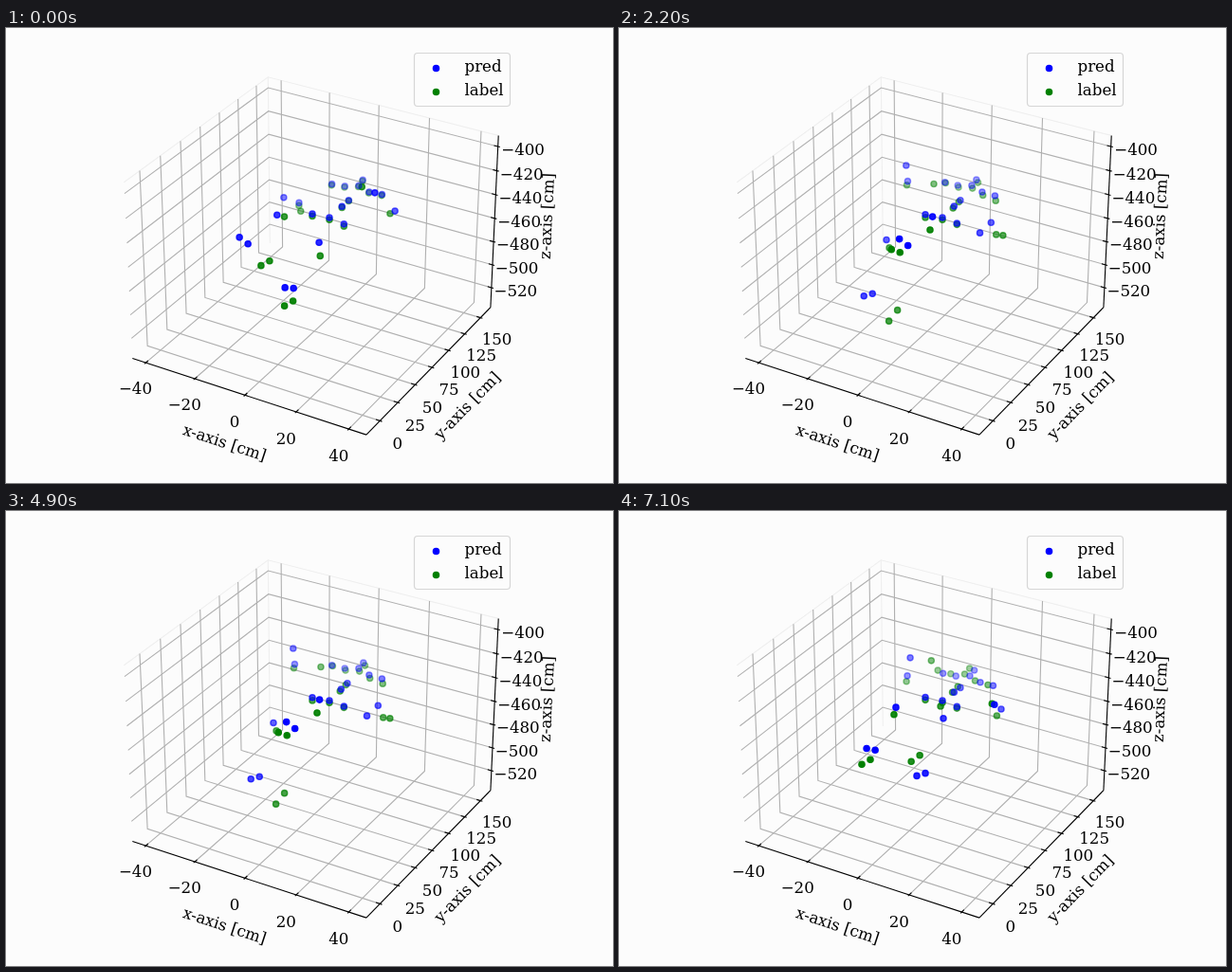
An HTML page that plays this animation: 640 px wide and 480 px high, repeating every 7200 ms.

```html
<!DOCTYPE html>
<html lang="en">
<head>
<meta charset="utf-8">
<title>Pose scatter</title>
<style>
  html, body { margin: 0; width: 100%; height: 100%; overflow: hidden; background: #fcfcfc; }
  svg { display: block; width: 640px; height: 480px; }
  text { font: 16.67px "DejaVu Serif", "Noto Serif", serif; fill: #000; }
  .mid { text-anchor: middle; }
  polyline { fill: none; stroke-width: 1.11; }
  .pane { stroke: #efefef; }
  .grid { stroke: #b0b0b0; }
  .axis { stroke: #000; }
  .box { fill: #fcfcfc; stroke: #d6d6d6; stroke-width: 1.2; }
  circle { stroke-width: 1.39; }
  .pred { fill: #00f; stroke: #00f; }
  .label { fill: #008000; stroke: #008000; }
</style>
</head>
<body>
<svg id="stage" viewBox="0 0 640 480"></svg>
<script>
const svg = document.getElementById('stage');
const LOOP = 7200, STEP = 100, CYCLE = 2700;

function add(tag, attrs, text) {
  const el = document.createElementNS('http://www.w3.org/2000/svg', tag);
  for (const k in attrs) el.setAttribute(k, attrs[k]);
  if (text !== undefined) el.textContent = text;
  return svg.appendChild(el);
}

// Perspective camera at azimuth -60°, elevation 30°; the box spans -1..1 on each axis
const AZ = -Math.PI / 3, EL = Math.PI / 6, DIST = 10, SCALE = 237.3;

function project([a, b, c]) {
  const x = a * 0.5952, y = b * 0.5952, z = c * 0.4464;
  const right = -x * Math.sin(AZ) + y * Math.cos(AZ);
  const ahead = x * Math.cos(AZ) + y * Math.sin(AZ);
  const up = z * Math.cos(EL) - ahead * Math.sin(EL);
  const near = ahead * Math.cos(EL) + z * Math.sin(EL);
  const k = SCALE * DIST / (DIST - near);
  return [325.6 + right * k, 231.4 - up * k];
}
const line = (cls, ...pts) => add('polyline', { class: cls, points: pts.map(project).join(' ') });
const caption = ([x, y], text, turn = 0) =>
  add('text', { class: 'mid', transform: `translate(${x} ${y}) rotate(${turn})`, y: 6 }, text);

// Each path runs over the two walls a grid line touches and ends on the axis
const axes = [
  { name: 'x', min: -45.5, max: 46.6, first: -40, last: 40, step: 20, tickDir: 1, nudge: [0, 4.5],
    path: v => [[v, 1, 1], [v, 1, -1], [v, -1, -1]] },
  { name: 'y', min: -18.7, max: 166.3, first: 0, last: 150, step: 25, tickDir: 0, nudge: [0, 4.5],
    path: v => [[-1, v, 1], [-1, v, -1], [1, v, -1]] },
  { name: 'z', min: -537.4, max: -391, first: -520, last: -400, step: 20, tickDir: 0, nudge: [-1, 6.5],
    path: v => [[-1, -1, v], [-1, 1, v], [1, 1, v]] }
];

line('pane', [-1, -1, 1], [-1, 1, 1], [1, 1, 1]);
line('pane', [-1, 1, 1], [-1, 1, -1]);

function drawAxis({ name, min, max, first, last, step, tickDir, nudge, path }, own) {
  const edge = v => path(v)[2];
  const outside = (v, k) => project(edge(v).map((c, i) => i === own ? c : c * k));
  for (let n = first; n <= last; n += step) {
    const v = 2 * (n - min) / (max - min) - 1;
    const mark = k => edge(v).map((c, i) => i === tickDir ? c * k : c);
    line('grid', ...path(v));
    line('axis', mark(0.967), mark(1.017));
    const [x, y] = outside(v, 1.145);
    caption([x + nudge[0], y + nudge[1]], String(n).replace('-', '−'));
  }
  line('axis', edge(-1), edge(1));
  const [p, q] = [project(edge(-1)), project(edge(1))];
  const turn = Math.atan2(q[1] - p[1], q[0] - p[0]) * 180 / Math.PI;
  const [x, y] = outside(0, 1.305);
  caption([x + 1.5 * nudge[0], y], name + '-axis [cm]', turn);
}
axes.forEach(drawAxis);

add('rect', { class: 'box', x: 430.5, y: 26.5, width: 101, height: 56, rx: 3.5 });
['pred', 'label'].forEach((name, i) => {
  add('text', { x: 483.5, y: 46 + 25 * i }, name);
  add('circle', { class: name, cx: 453.5, cy: 42.5 + 25 * i, r: 3.1 });
});

// Walking rhythm: the phase lingers around the long stride, then hurries through the rest
function phase(t) {
  const a = 2 * Math.PI * t / CYCLE - Math.PI / 3;
  return a - 0.97 * Math.sin(a);
}

// A joint's orbit: centre, then its reach along cosine and sine of the phase
const orbit = ([x, y, ax, ay, bx, by], p) =>
  [x + ax * Math.cos(p) + bx * Math.sin(p), y + ay * Math.cos(p) + by * Math.sin(p)];
const shift = ([x, y], dx, dy) => [x + dx, y + dy];

// All joints as [point, alpha]
function pose({ hipY, sway, heel, neck, arms, legs }, t) {
  const p = phase(t), s = Math.sin(p);
  const roll = sway * (0.38 - 0.6 * Math.cos(p) - 0.75 * s);
  const top = orbit(neck, p);
  const chest = [361 + 0.3 * (top[0] - 371) - 1.3 * roll, 182.5 + 0.6 * (top[1] - 167.5)];
  const pelvis = [341, hipY];
  const spine = [pelvis[0] + 0.65 * (chest[0] - pelvis[0]), pelvis[1] + 0.65 * (chest[1] - pelvis[1])];
  const joints = [
    [top, 0.4],
    [shift(top, 4.3 + 0.6 * roll, -6), 0.38],
    [shift(top, -14.7, 0.5 - 0.6 * roll), 0.36],
    [shift(top, -28.3, -1.8 - 1.5 * roll), 0.4],
    [shift(top, 11, 6.6 + 0.3 * roll), 0.45],
    [shift(top, 24.5, 9.3 + 1.5 * roll), 0.5],
    [chest, 0.52], [spine, 0.62], [pelvis, 0.7],
    [shift(pelvis, -18, -3.8 + 0.6 * roll), 0.7],
    [shift(pelvis, 15.3, 6.8 - 0.7 * roll), 0.65]
  ];
  arms.forEach(([elbow, hand], side) => {
    joints.push([orbit(elbow, p), 0.42 + 0.2 * side], [orbit(hand, p), 0.5 + (0.32 + 0.15 * s) * side]);
  });
  legs.forEach(([knee, ankle], side) => {
    const k = orbit(knee, p), a = orbit(ankle, p), lead = (side ? -0.1 : 0.2) * s;
    const toe = shift(a, -9, heel + 0.35 * (a[1] - k[1] - 50));
    joints.push([k, 0.82 + lead], [a, 0.92 + lead], [toe, 0.92 + lead]);
  });
  return joints;
}

// Limbs: left side first
const figures = {
  label: {
    hipY: 202.3, sway: 2.4, heel: 6,
    neck: [368.4, 169.8, 2.4, -2.3, -4, 0.4],
    arms: [
      [[305.5, 181.2, 4, 9.9, 2.6, 17], [322, 173.2, -14, 23, -12, 12]],
      [[401, 207.9, 4.9, -15, 4, -12.2], [387.3, 190.5, -16.5, -30.3, -20, -32.8]]
    ],
    legs: [
      [[290.8, 210.4, 4.1, -16.6, 6.4, -24], [273.8, 259.8, 0, -23, -20, -41.4]],
      [[334.5, 221, -2, 22.2, 6.3, 11.2], [308.6, 267.6, -3.6, 28.2, 12, 35]]
    ]
  },
  pred: {
    hipY: 200, sway: 1, heel: 0,
    neck: [371, 169.9, 0.8, -2.9, -0.8, 3.4],
    arms: [
      [[306.1, 176.7, 3.4, 11.4, 2.2, 16.8], [300.7, 163.5, -8.7, 20.2, -3.3, 21.5]],
      [[404.6, 202, 8.5, -10.1, 13.6, -4.7], [391.1, 193.2, 0, -25.4, 10.7, -26.7]]
    ],
    legs: [
      [[288.2, 205.1, -1.2, -12.2, 6.1, -20.2], [263.6, 245.6, -9.7, -26.4, -5, -38.7]],
      [[335.7, 219.5, -4.8, 11.6, 4.5, 22.2], [312.6, 270, -8.2, 13.6, 6.9, 42.8]]
    ]
  }
};

const dots = {};
for (const name in figures)
  dots[name] = pose(figures[name], 0).map(() => add('circle', { class: name, r: 3.1 }));

function draw(t) {
  for (const name in figures)
    pose(figures[name], t).forEach(([[x, y], alpha], i) => {
      const a = Math.min(1, alpha), dot = dots[name][i];
      const attrs = { cx: x, cy: y, 'fill-opacity': a, 'stroke-opacity': a };
      for (const k in attrs) dot.setAttribute(k, attrs[k].toFixed(2));
    });
}

const start = performance.now();
function frame() {
  const t = (performance.now() - start) % LOOP;
  draw(Math.floor(t / STEP) * STEP);
  requestAnimationFrame(frame);
}
frame();
</script>
</body>
</html>
```
